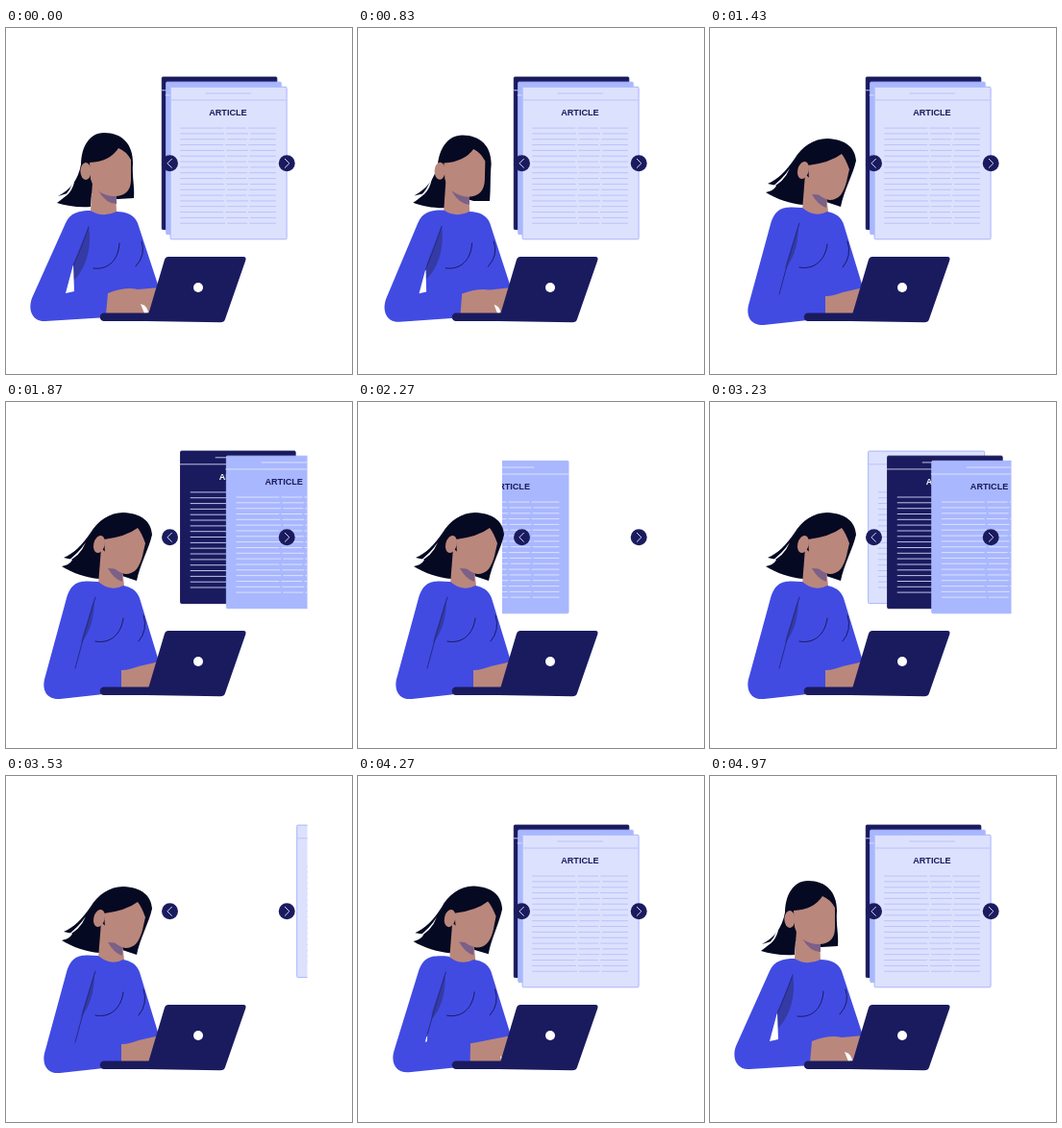
Write an HTML page that moves like this. It is 360 by 360 pixels and loops after 5 s.

```html
<!DOCTYPE html>
<html lang="en">
<head>
<meta charset="utf-8">
<title>Article reader</title>
<style>
  html, body { margin: 0; width: 100%; height: 100%; overflow: hidden; background: #fff; }
  svg { display: block; width: 100vw; height: 100vh; }
  text { font: bold 9.1px "Liberation Sans", Arial, sans-serif; }
  .line { fill: none; stroke-width: 1; stroke-linecap: round; }
</style>
</head>
<body>
<svg viewBox="0 0 360 360">
  <defs>
    <clipPath id="window"><rect x="150" y="40" width="163.5" height="190"/></clipPath>
  </defs>

  <g clip-path="url(#window)" id="slots"></g>

  <g fill="#1a1b5e" stroke-linecap="round" stroke-linejoin="round">
    <circle cx="170.5" cy="140.800" r="8.500"/>
    <circle cx="292.2" cy="140.800" r="8.500"/>
    <path d="M172.400 136.300L167.900 140.800L172.400 145.300M290.300 136.300L294.800 140.800L290.300 145.300" fill="none" stroke="#d5d9f5"/>
  </g>

  <g id="hair"></g>
  <g id="neck"></g>
  <g id="face"></g>
  <g id="torso"></g>

  <g fill="#1a1b5e">
    <path d="M102 296.500H150V305H102A4.200 4.200 0 0 1 102 296.500Z"/>
    <path d="M169 238H247Q250.500 238 249.200 242L228 303Q227 306.300 223 306.300L146 305L165 241Q166 238 169 238Z"/>
    <circle cx="200" cy="270" r="5" fill="#fff"/>
  </g>
</svg>
<script>
const LOOP = 5000;
const $ = id => document.getElementById(id);
const clamp = x => Math.min(1, Math.max(0, x));
const inOut = x => x < 0.5 ? 4 * x ** 3 : 1 - 4 * (1 - x) ** 3;

function add(parent, tag, attrs) {
  const el = document.createElementNS('http://www.w3.org/2000/svg', tag);
  for (const k in attrs) el.setAttribute(k, attrs[k]);
  return parent.appendChild(el);
}

// Pages: fill, border, ruled lines, title
const themes = [
  ['#dce1fe', '#a9b6fb', '#b9c3fa', '#1a1b5e'],
  ['#a9b7fe', '#a9b7fe', '#dbe1ff', '#1a1b5e'],
  ['#1a1b5e', '#1a1b5e', '#bcc2e8', '#ffffff']
];
const slots = [[170.6, 60.8], [166.2, 55.7], [161.8, 50.6]];

function makePage([fill, edge, rule, ink]) {
  const g = add($('slots'), 'g', {});
  add(g, 'rect', { x: 0.5, y: 0.5, width: fill === edge ? 119.5 : 121, height: 158.5, rx: 1, fill, stroke: edge });
  let d = 'M0 14.200H120.500M37 7.200H84';
  for (let i = 0; i < 18; i++) {
    const y = (43.3 + i * 5.83).toFixed(1);
    const a = 55 + i % 3, b = 79 + i * 2 % 3;
    d += `M11 ${y}H${a}M${a + 3} ${y}H${b}M${b + 3} ${y}H110`;
  }
  add(g, 'path', { d, class: 'line', stroke: rule });
  add(g, 'text', { x: 40.6, y: 30, fill: ink }).textContent = 'ARTICLE';
  return g;
}
const pages = themes.map(makePage);

const SKIN = '#ba877c', HAIR = '#050922', NAVY = '#1a1b5e';

// Layer, upright shape, leaning shape, fill or stroke
const parts = [
  ['hair', 'M78 142C78 125 86 109 102 109C121 109 132 121 132 140C131 155 134 165 133 177L116 178L89 172L88 186C75 187 63 185 53 182C57 179 61 176 64 172L54 175C67 168 75 158 78 142Z',
    'M88 136C95 124 108 115 122 115C141 116 151 124 152 138C149 152 139 170 136 186L121 181L104 168L97 184C84 183 69 178 58 171C63 170 67 168 69 164L60 162C70 158 79 149 88 136Z', HAIR],
  ['hair', 'M57 178Q68 170 72 153Q71 172 57 178Z', 'M62 167Q75 158 83 146Q77 161 62 167Z', '#fff'],

  ['neck', 'M90 160L88 190Q100 199 115 192L114 168Z',
    'M99 152L96 190Q108 199 123 192L121 172Z', SKIN],
  ['neck', 'M96 169Q104 183 115 183L115 172Z',
    'M106 173Q112 184 121 187L121 174Z', '#7b6087'],

  ['face', 'M83 140A5.6 9 0 0 1 83 158A5.6 9 0 0 1 83 140Z',
    'M99 139A5.6 9 14 0 1 95 157A5.6 9 14 0 1 99 139Z', SKIN],
  ['face', 'M87 140Q108 139 117 125Q125 128 130 137L130 158C130 168 125 175 113 175C101 175 91 168 88 157Z',
    'M102 143Q125 140 137 131Q141 136 145 147L142 160C139 171 135 179 124 179C113 176 105 168 103 157Z', SKIN],

  ['torso', 'M88 190C76 190 67 192 62 203L27 281C22 295 29 306 41 305L106 301L106 278L160 273L137 203C134 195 126 191 115 191Q101 198 88 190Z',
    'M96 187C78 186 69 185 63 204L41 285C36 300 43 310 56 309L120 302L120 281L160 273L139 204C136 196 131 193 122 191Q109 198 96 187Z', '#414be2'],
  ['torso', 'M86 206C90 230 82 252 70 263L70 246Z',
    'M92 204C92 226 87 240 78 251L79 246Z', '#343ba4'],
  ['torso', 'M70 246L62 276L71 274Z', 'M73 273L72 277L72 277Z', '#fff'],
  ['torso', 'M86 207Q78 230 70 247', 'M93 203Q82 238 72 277', '', '#262b85'],
  ['torso', 'M91 250C106 252 117 242 118 224', 'M93 249C108 252 120 242 122 225', '', NAVY],
  ['torso', 'M141 222Q146 236 135 248', 'M143 222Q148 237 138 249', '', NAVY],
  ['torso', 'M106 276C118 271 129 270 137 272L160 270L148 300L140 298L104 298Z',
    'M120 279C127 279 132 277 138 275L160 270L148 300L140 299L120 299Z', SKIN],
  ['torso', 'M140 287Q147 289 148 296L144 297Z', 'M150 292Q151 293 151 296L151 297Z', '#fff']
].map(([layer, from, to, fill, stroke]) => ({
  layer, from,
  el: add($(layer), 'path', stroke ? { class: 'line', stroke } : { fill }),
  to: to.match(/[\d.]+/g).map(Number)
}));

function morph({ el, from, to }, p) {
  let i = 0;
  el.setAttribute('d', from.replace(/[\d.]+/g, n => +(+n + (to[i++] - n) * p).toFixed(2)));
}

const leanAt = t => t < 2500 ? inOut(clamp((t - 515) / 930)) : 1 - inOut(clamp((t - 4060) / 560));

// Pages leave to the right and return from the left, front one first
const swipes = [1463, 2928], SLIDE = 412, TRAVEL = 150;

function slide(t, slot) {
  const start = swipes[t < 2800 ? 0 : 1] + slot * 100;
  const out = clamp((t - start) / SLIDE);
  if (out < 1) return TRAVEL * out ** 3;
  return -TRAVEL * (1 - clamp((t - start - 718) / SLIDE)) ** 3;
}

let front = -1;
function setOrder(first) {
  if (first === front) return;
  front = first;
  for (let slot = 2; slot >= 0; slot--) $('slots').append(pages[(first + slot) % 3]);
}

function draw(t) {
  const first = t > 2130 && t < 3595 ? 1 : 0;
  setOrder(first);
  slots.forEach(([x, y], i) =>
    pages[(first + i) % 3].setAttribute('transform', `translate(${x + slide(t, i)} ${y})`));

  // The head follows the body back a little late, and the hair swings as she leans in
  const body = leanAt(t);
  const head = t < 2500 ? body : leanAt(t - 50);
  for (const part of parts) morph(part, part.layer === 'torso' ? body : head);
  const swing = Math.sin(Math.PI * clamp((t - 580) / 500)) ** 2;
  $('hair').setAttribute('transform', `translate(${3.5 * swing} ${1.5 * swing})`);
}

function tick() {
  draw(performance.now() % LOOP);
  requestAnimationFrame(tick);
}
tick();
</script>
</body>
</html>
```
